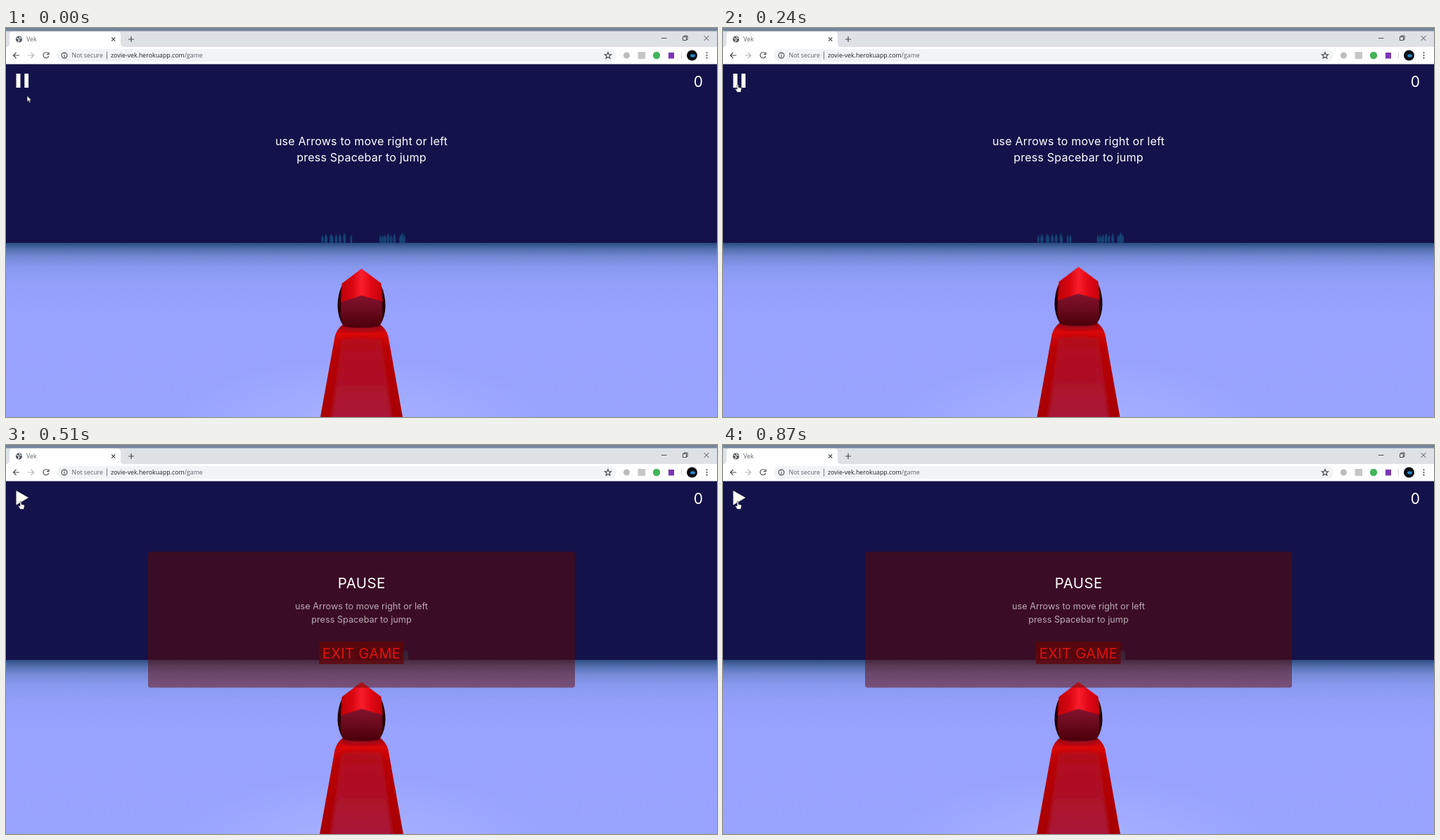
An HTML page for the animation above (900 ms loop, 1011x554 px).

```html
<!DOCTYPE html>
<html lang="en">
<head>
<meta charset="utf-8">
<title>Vek</title>
<style>
html, body { margin: 0; width: 100%; height: 100%; overflow: hidden; background: #13124a; }
svg { display: block; width: 1011px; height: 554px; }
.ui { font: 8.8px "Open Sans", "Noto Sans", sans-serif; fill: #5f6368; }
.game { font-family: Inter, "Open Sans", sans-serif; fill: #fff; }
.mid { text-anchor: middle; }
.line { fill: none; stroke: #4a4d51; stroke-width: 1.2; }

.hero { animation: rise .9s infinite; }
.tree { animation: drift .9s infinite; }
.late { animation: drift .9s infinite, tree-in .9s step-end infinite; }
.running { animation: hud-out .9s step-end infinite; }
.menu { animation: menu-in .9s step-end infinite; }
.arrow { animation: arrow-move .9s step-end infinite; }
.hand { animation: hand-move .9s step-end infinite; }

@keyframes rise {
  0% { transform: translateY(0); animation-timing-function: steps(16, end); }
  53.33%, 100% { transform: translateY(-5.2px); }
}
@keyframes drift {
  0% { transform: translate(var(--from), 306px); animation-timing-function: steps(16, end); }
  53.33%, 100% { transform: translate(var(--to), 306px) scale(1.06); }
}
@keyframes tree-in { 0% { opacity: 0; } 6.6%, 100% { opacity: 1; } }
@keyframes hud-out { 0% { opacity: 1; } 56.6%, 100% { opacity: 0; } }
@keyframes menu-in { 0% { opacity: 0; } 56.6%, 100% { opacity: 1; } }
@keyframes arrow-move {
  0% { transform: translate(30px, 96.5px); opacity: 1; }
  3.3% { transform: translate(26px, 93.5px); opacity: 1; }
  6.6% { transform: translate(21px, 90px); opacity: 1; }
  9.9% { transform: translate(17px, 86.5px); opacity: 1; }
  13.3%, 100% { transform: translate(17px, 86.5px); opacity: 0; }
}
@keyframes hand-move {
  0% { transform: translate(18px, 84px); opacity: 0; }
  13.3% { transform: translate(18px, 84px); opacity: 1; }
  16.6% { transform: translate(19.5px, 82px); opacity: 1; }
  19.9%, 100% { transform: translate(21px, 80px); opacity: 1; }
}
</style>
</head>
<body>
<svg viewBox="0 0 1011 554">
  <defs>
    <linearGradient id="floor" gradientUnits="userSpaceOnUse" x1="0" y1="306" x2="0" y2="554">
      <stop offset="0" stop-color="#2b4c80"/>
      <stop offset=".035" stop-color="#526ead"/>
      <stop offset=".08" stop-color="#7389d6"/>
      <stop offset=".14" stop-color="#8898ee"/>
      <stop offset=".23" stop-color="#939ffa"/>
      <stop offset=".4" stop-color="#98a2ff"/>
      <stop offset="1" stop-color="#99a4ff"/>
    </linearGradient>
    <radialGradient id="glow" gradientUnits="userSpaceOnUse" cx="505" cy="575" r="270" gradientTransform="translate(0 345) scale(1 .4)">
      <stop offset="0" stop-color="#a9b3ff"/>
      <stop offset="1" stop-color="#a9b3ff" stop-opacity="0"/>
    </radialGradient>
    <linearGradient id="hood">
      <stop offset="0" stop-color="#bd0008"/>
      <stop offset=".3" stop-color="#dc0712"/>
      <stop offset=".5" stop-color="#fa1e2c"/>
      <stop offset=".7" stop-color="#e40a16"/>
      <stop offset="1" stop-color="#c4000a"/>
    </linearGradient>
    <linearGradient id="head">
      <stop offset="0" stop-color="#160004"/>
      <stop offset=".1" stop-color="#3c0008"/>
      <stop offset=".5" stop-color="#5a0010"/>
      <stop offset=".9" stop-color="#4a0009"/>
      <stop offset="1" stop-color="#160004"/>
    </linearGradient>
    <linearGradient id="nape" x2="0" y2="1">
      <stop offset="0" stop-color="#84132f"/>
      <stop offset=".5" stop-color="#6a0a1e"/>
      <stop offset="1" stop-color="#4c000a"/>
    </linearGradient>
    <linearGradient id="cape" gradientUnits="userSpaceOnUse" x1="0" y1="423" x2="0" y2="566">
      <stop offset="0" stop-color="#8e0210"/>
      <stop offset=".04" stop-color="#b80610"/>
      <stop offset=".09" stop-color="#dc0808"/>
      <stop offset=".14" stop-color="#cf0405"/>
      <stop offset=".25" stop-color="#b80002"/>
      <stop offset="1" stop-color="#a60003"/>
    </linearGradient>
    <linearGradient id="back" x2="0" y2="1">
      <stop offset="0" stop-color="#b40c1c"/>
      <stop offset=".5" stop-color="#ae1128"/>
      <stop offset="1" stop-color="#a9173c"/>
    </linearGradient>
    <filter id="soft"><feGaussianBlur stdDeviation="2.5"/></filter>
    <filter id="haze"><feGaussianBlur stdDeviation=".45"/></filter>
  </defs>

  <!-- game scene -->
  <rect y="51" width="1011" height="256" fill="#13124a"/>
  <g id="forest" fill="#174474" filter="url(#haze)"></g>
  <rect y="306" width="1011" height="248" fill="url(#floor)"/>
  <rect y="440" width="1011" height="114" fill="url(#glow)"/>

  <g class="hero">
    <path fill="url(#cape)" d="M479 422.5Q471 427.500 467.700 439L447 554L444.800 566H566.200L564 554L543.500 439Q540 427.500 532 422.500Z"/>
    <path fill="url(#back)" filter="url(#soft)" d="M477 444Q505 440 534 444L550 566H461Z"/>
    <ellipse cx="505.5" cy="428" rx="25" ry="4.5" fill="#960b1e" opacity=".7" filter="url(#soft)"/>
    <path fill="url(#head)" d="M477 368Q471.5 380 471.5 397Q472 412 479 423Q483 427 505.5 427Q528 427 532 423Q539 412 539.5 397Q539.5 380 534 368Z"/>
    <path fill="url(#nape)" d="M476.5 388L505.5 380L534.5 388L535 408Q533 419 530 424Q524 426 505.5 426Q487 426 481 424Q478 419 476 408Z"/>
    <path fill="url(#hood)" d="M505.5 342.7L533.5 363.5L535.5 389.5L505.5 381L476 390.5L477.5 364Z"/>
  </g>

  <!-- heads-up display -->
  <g class="game">
    <g class="mid running" font-size="16" letter-spacing=".22">
      <text x="505.5" y="166.5">use Arrows to move right or left</text>
      <text x="505.5" y="189.5">press Spacebar to jump</text>
    </g>
    <text x="984.3" y="83.8" font-size="21" class="mid">0</text>
    <path class="running" d="M14.5 65h6v20h-6zM26.3 65h5.7v20h-5.7z"/>
    <g class="menu">
      <path d="M14.5 65L32 75L14.5 85.5Z" fill="#fffef4"/>
      <rect x="202" y="152" width="607" height="193.5" rx="3.5" fill="#630600" fill-opacity=".5"/>
      <rect x="445" y="280" width="120.5" height="32" fill="#600408" fill-opacity=".76"/>
      <g class="mid">
        <text x="505.7" y="204.3" font-size="20.5" letter-spacing=".4">PAUSE</text>
        <g font-size="12.7" fill="#bdaab6">
          <text x="505.5" y="233.8">use Arrows to move right or left</text>
          <text x="505.5" y="253.3">press Spacebar to jump</text>
        </g>
        <text x="505.5" y="304" font-size="20" letter-spacing=".4" fill="#dc1410">EXIT GAME</text>
      </g>
    </g>
  </g>

  <!-- browser frame -->
  <rect width="1011" height="5" fill="#75859a"/>
  <rect y="4.5" width="1011" height="23" fill="#dee1e6"/>
  <rect y="27" width="1011" height="24.5" fill="#fff"/>
  <path fill="#fff" d="M0 27Q5 27 5 22V10Q5 5 10 5H158Q163 5 163 10V22Q163 27 168 27Z"/>
  <circle cx="18.5" cy="16" r="4.6" fill="#54585d"/>
  <path d="M15 14.5l3 1 1 2-2 2M19 12.5l1 2 2.5 .5" fill="none" stroke="#fff" stroke-width="1.2"/>
  <g class="line">
    <path d="M150.2 13.5l5 5m0-5l-5 5M174 16h8m-4-4v8"/>
    <path stroke-width="1" d="M932 14.5h7.5M992.5 11l7 7m0-7l-7 7M962.5 12.5h5v5h-5zM964 12.5v-1.5h5v5.5h-1.5"/>
    <path d="M19 39h-8.5m4-4l-4 4 4 4"/>
    <path stroke="#b5b8bc" d="M31 39h8.5m-4-4l4 4-4 4"/>
    <path d="M60 36.2A4 4 0 1 0 60.7 40M61 34.5v3.2h-3.2"/>
  </g>
  <rect x="72" y="30" width="796" height="18" rx="9" fill="#f1f3f4"/>
  <circle cx="83" cy="39" r="3.9" class="line"/>
  <path class="line" d="M83 38.4v2.9M83 36.5v1"/>
  <path d="M143.5 33.5v11" stroke="#777b80"/>
  <path id="star" class="line"/>
  <g class="ui">
    <text x="29" y="19">Vek</text>
    <text x="93.5" y="42.2">Not secure</text>
    <text x="149" y="42.2"><tspan fill="#202124">zovie-vek.herokuapp.com</tspan>/game</text>
  </g>
  <circle cx="882.5" cy="39" r="4.5" fill="#bcbcbc"/>
  <rect x="898.5" y="34" width="10.5" height="10" rx="1" fill="#c6c6c6"/>
  <circle cx="925" cy="39" r="5.2" fill="#43b45a"/>
  <rect x="942" y="35" width="8" height="8.5" fill="#7b35b5"/>
  <path d="M960.5 34.5v9" stroke="#d4d6d9"/>
  <circle cx="975.5" cy="39" r="7.5" fill="#0a0d12"/>
  <ellipse cx="976.5" cy="39.5" rx="3.5" ry="2.2" fill="#2486c4"/>
  <g fill="#4a4d51">
    <circle cx="996.5" cy="35.3" r="1.1"/><circle cx="996.5" cy="39" r="1.1"/><circle cx="996.5" cy="42.7" r="1.1"/>
  </g>

  <!-- pointer -->
  <path class="arrow" fill="#fff" stroke="#111" stroke-width=".6" d="M0 0V8.5L2 6.7L3.5 10L5 9.3L3.6 6.2H6.2Z"/>
  <path class="hand" fill="#fff" stroke="#111" stroke-width=".6" d="M-1 1Q0-.5 1 1V4.5L4.5 5.2Q5.5 5.6 5.3 7L4.3 11.5H-.7L-3.3 7.6Q-3.5 6-2 6.4L-1 7.3Z"/>
</svg>
<script>
const make = (name, attrs, parent) => {
  const el = document.createElementNS("http://www.w3.org/2000/svg", name);
  for (const key in attrs) el.setAttribute(key, attrs[key]);
  return parent.appendChild(el);
};

// Each tree: start x, end x, height, half width
const trees = [
  [450, 446.5, 12, 1.5], [455, 452, 13, 2.3], [462, 459.5, 13.5, 2],
  [464, 461.5, 11.5, 1.5], [469.5, 467, 12.5, 2], [475, 472.5, 13.5, 2],
  [481, 479.5, 15, 1.7], [482, 482, 11, 1.2], [490.8, 489.8, 12, 1.5],
  [494.3, 493.8, 12, 1.5, "late"],
  [532.5, 534, 12, 1.7], [535.5, 537.5, 11.5, 1.7], [539, 541.5, 12.5, 1.9],
  [543.3, 546, 14.5, 1.9], [547.5, 550, 12, 1.7], [552.3, 556, 14, 2],
  [560.8, 564, 12.5, 1.8], [563.5, 567.5, 15.5, 2.2], [566.5, 570.5, 13, 1.5]
];
const forest = document.getElementById("forest");
for (const [from, to, h, w, kind] of trees) {
  make("path", {
    class: kind || "tree",
    style: `--from:${from}px;--to:${to}px`,
    d: `M${-w * .7} 0L${-w} ${-h * .35}L${-w * .8} ${-h * .65}L0 ${-h}L${w * .8} ${-h * .65}L${w} ${-h * .35}L${w * .7} 0Z`
  }, forest);
}

const points = Array.from({ length: 10 }, (_, i) => {
  const r = i % 2 ? 2.1 : 4.8, a = i * Math.PI / 5;
  return [856 + r * Math.sin(a), 39.3 - r * Math.cos(a)];
});
document.getElementById("star").setAttribute("d", `M${points.join("L")}Z`);
</script>
</body>
</html>
```
